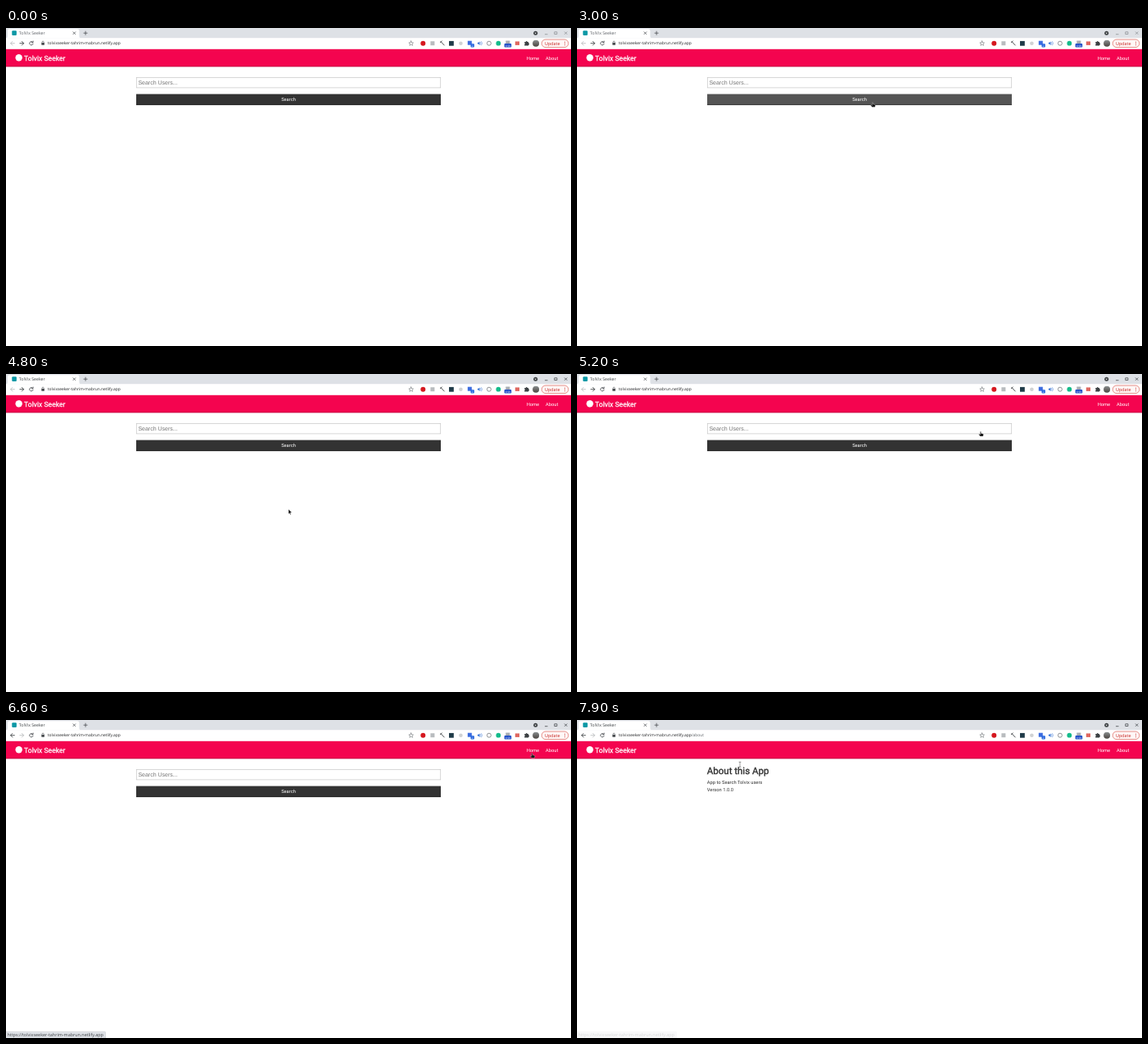
Animation of 690x388 px, one loop 8000 ms. Source, as an HTML page:

```html
<!DOCTYPE html>
<html lang="en">
<head>
<meta charset="utf-8">
<title>User search</title>
<style>
  html, body { margin: 0; width: 100%; height: 100%; overflow: hidden; background: #fff; }
  svg { display: block; width: 100vw; height: 100vh; }
  text { font-family: "Open Sans", "Noto Sans", sans-serif; text-rendering: geometricPrecision; white-space: pre; }
  .page text { font-family: Roboto, Arial, sans-serif; font-size: 5.75px; fill: #333; }
  .page .field { font-family: "Liberation Sans", Arial, sans-serif; font-size: 7px; fill: #757575; }
  .page .light { fill: #fff; }
  .page .brand { font-size: 8.62px; fill: #fff; stroke: #fff; stroke-width: .28px; }
  .page .title { font-size: 11.5px; stroke: #333; stroke-width: .38px; }
  .url { font-size: 4.9px; fill: #202124; }
  .list text { font-size: 5.5px; font-weight: 600; fill: #222; }
  .line { fill: none; stroke-linecap: round; stroke-linejoin: round; }
</style>
</head>
<body>
<svg viewBox="0 0 690 388" preserveAspectRatio="none">
  <defs>
    <filter id="shade" x="-10%" y="-20%" width="120%" height="150%">
      <feDropShadow dx="0" dy=".7" stdDeviation=".9" flood-opacity=".4"/>
    </filter>
    <linearGradient id="face" x2="0" y2="1">
      <stop stop-color="#8b8f90"/><stop offset="1" stop-color="#4b4541"/>
    </linearGradient>
  </defs>
  <rect width="690" height="388" fill="#fff"/>

  <!-- tab strip -->
  <rect width="690" height="12.2" fill="#dee1e6"/>
  <path d="M0 12.2q2 0 2-2V3.6q0-2.4 2.4-2.4H87q2.4 0 2.4 2.4v6.6q0 2 2 2z" fill="#fff"/>
  <rect x="7.3" y="3.3" width="5.6" height="5.6" rx="1" fill="#0b98a5"/>
  <text id="tab" x="15.8" y="8" font-size="5.2">TolVix Seeker</text>
  <g class="line" stroke="#45494d" stroke-width=".75">
    <path d="M82 4.8l2.8 2.8m0-2.8L82 7.6M95 6.2h4.2M97.1 4.1v4.2"/>
  </g>
  <circle cx="646.7" cy="6.2" r="2.5" fill="#3c4043"/>
  <path d="M645.5 5.7h2.4l-1.2 1.5z" fill="#fff"/>
  <g id="controls" class="line" stroke-width=".7">
    <path d="M658.4 7.7h2.7M670.2 4.8h2.7v2.7h-2.7zM682.3 4.8l2.7 2.7m0-2.7l-2.7 2.7"/>
  </g>

  <!-- toolbar -->
  <g class="line" stroke-width=".85">
    <path id="back" d="M10.4 18.7H5.7M7.9 16.4l-2.3 2.3 2.3 2.3"/>
    <path id="forward" d="M16.9 18.7h4.7M19.4 16.4l2.3 2.3-2.3 2.3"/>
    <path d="M32.7 17.3a2.2 2.2 0 1 0 .4 2M33.1 16v1.7h-1.8" stroke="#45494d"/>
    <path d="M44 18v-.8a1.1 1.1 0 0 1 2.2 0v.8" stroke="#45494d" stroke-width=".6"/>
    <path d="M494.7 15.9l.8 1.9 2 .2-1.5 1.3.5 2-1.8-1.1-1.8 1.1.5-2-1.5-1.3 2-.2z" stroke="#5f6368" stroke-width=".55"/>
  </g>
  <rect x="43.3" y="17.9" width="3.6" height="2.8" rx=".4" fill="#45494d"/>
  <text class="url" x="50.8" y="20.4"><tspan class="host"></tspan><tspan id="path" fill="#5f6368">/about</tspan></text>

  <!-- extensions -->
  <circle cx="509.3" cy="18.7" r="3" fill="#d5181f"/>
  <rect x="518.4" y="16.2" width="5" height="5" fill="#b9bcbf"/>
  <path class="line" d="M531 16.5l4.2 4.5M530.5 17.7l1.8-1.8" stroke="#4c4f52"/>
  <rect x="541" y="15.9" width="5.8" height="5.8" fill="#203b49"/>
  <circle cx="555.4" cy="18.7" r="2.3" fill="#d0d2d4"/>
  <rect x="563.8" y="15.7" width="5" height="5" fill="#3b6ce0"/>
  <rect x="567.5" y="19.2" width="4.3" height="4.2" rx=".7" fill="#1e5fdc"/>
  <text x="568.6" y="22.7" font-size="3.6" fill="#fff">2</text>
  <path d="M575.8 17.8h1.2l1.5-1.4v4.6L577 19.6h-1.2z" fill="#3974d5"/>
  <path class="line" d="M579.5 17.3q1.2 1.4 0 2.8M580.7 16.5q1.8 2.2 0 4.4" stroke="#3974d5" stroke-width=".5"/>
  <circle cx="589.9" cy="18.7" r="2.5" fill="none" stroke="#73777b" stroke-width=".8"/>
  <circle cx="601.3" cy="18.7" r="2.9" fill="#14bc8b"/>
  <rect x="610.3" y="15.5" width="5" height="4" fill="#a9adb2"/>
  <rect x="608.6" y="19" width="8.6" height="4.6" rx=".8" fill="#214fc8"/>
  <text x="609.8" y="22.6" font-size="3.1" fill="#fff">9.99</text>
  <rect x="621.8" y="16.4" width="5.2" height="4.5" fill="#df6760"/>
  <path d="M633.2 17.1h1.5a1 1 0 1 1 2 0h1.4v1.5a1 1 0 1 1 0 2v.9h-4.9V20a1 1 0 0 0 0-1.8z" fill="#3c4043"/>
  <circle cx="647.1" cy="18.7" r="4" fill="url(#face)"/>
  <rect x="654.2" y="14" width="32.6" height="9.6" rx="4.8" fill="#fff7f6" stroke="#d8554c" stroke-width=".65"/>
  <text x="658.1" y="20.6" font-size="5.4" fill="#c5221f">Update</text>
  <g fill="#c5221f"><circle cx="682.4" cy="16.9" r=".5"/><circle cx="682.4" cy="18.8" r=".5"/><circle cx="682.4" cy="20.7" r=".5"/></g>

  <!-- page -->
  <g class="page">
    <rect y="25.8" width="690" height="21.3" fill="#f4044f"/>
    <rect y="46.5" width="690" height=".8" fill="#b90a40"/>
    <circle cx="15.7" cy="36.3" r="4.2" fill="#fff"/>
    <text class="brand" x="22.1" y="39.5">Tolvix Seeker</text>
    <text class="light" x="635.7" y="38.7">Home</text>
    <text class="light" x="659.1" y="38.7">About</text>

    <g id="home">
      <rect x="159.3" y="60.6" width="371.4" height="12.3" fill="#fff" stroke="#c6c6c6" stroke-width=".7"/>
      <rect id="ring" x="159.2" y="60.7" width="371.6" height="12.2" rx=".8" fill="none" stroke="#111" stroke-width="1.2"/>
      <text class="field" x="161.4" y="69.2">Search Users...</text>
      <path id="caret" d="M161.6 63.4v6.8" stroke="#222" stroke-width=".4"/>
      <rect id="button" x="159" y="80.6" width="372" height="13.4"/>
      <path d="M159 93.7h372" stroke="#151515" stroke-width=".6"/>
      <text class="light" x="345" y="89.1" text-anchor="middle">Search</text>
    </g>
    <g id="about">
      <text class="title" x="158.8" y="66.1">About this App</text>
      <text x="158.8" y="78">App to Search Tolvix users</text>
      <text x="158.8" y="86.9">Verson 1.0.0</text>
    </g>
  </g>

  <g id="list" class="list">
    <rect x="158.8" y="76.5" width="69.1" height="29" rx="1" fill="#fff" filter="url(#shade)"/>
    <text x="163.2" y="85.4">tahrim mabrun</text>
    <text x="163.2" y="98.4">evan</text>
  </g>

  <g id="status">
    <path id="bubble" stroke="#c3c6ca" stroke-width=".5" fill="#dee1e6"/>
    <text x="1.4" y="385.8" font-size="5.45" fill="#3f4347">https://<tspan class="host"></tspan><tspan id="target">/about</tspan></text>
  </g>

  <g id="cursor">
    <path id="arrow" d="M0 0v5.8l1.3-1.1.9 2 .9-.4-.9-2 1.8-.2z" fill="#111" stroke="#fff" stroke-width=".35"/>
    <path id="hand" d="M-.6.4q.6-.7 1.1 0v2l2.2.5q.8.2.7 1l-.4 2.1h-3.7L-2.4 3.8q.1-.8.9-.5l.9.7z" fill="#111" stroke="#fff" stroke-width=".3"/>
    <path id="beam" class="line" d="M-1-3h2M0-3v6M-1 3h2" stroke="#555" stroke-width=".55"/>
  </g>
</svg>
<script>
const LOOP = 8000, STEP = 100;
const $ = id => document.getElementById(id);
const show = (id, on) => $(id).setAttribute('display', on ? 'inline' : 'none');
const within = (t, a, b) => t >= a && t < b;

document.querySelectorAll('.host').forEach(el => {
  el.textContent = 'tolvixseeker-tahrim-mabrun.netlify.app';
});

// Pointer path: time, x, y, shape
const path = [
  [2000, 535, 178, 'arrow'], [2300, 350, 140, 'arrow'], [2450, 278, 133, 'arrow'],
  [2600, 305, 147, 'arrow'], [2800, 355, 72, 'beam'], [2900, 361, 86, 'hand'],
  [3000, 361, 90.5, 'hand'], [3300, 200, 88, 'hand'], [3400, 137, 83, 'arrow'],
  [3600, 180, 68.5, 'beam'], [3700, 195.7, 67.3, 'beam'], [4200, 195.7, 67.3, 'beam'],
  [4300, 240, 100, 'arrow'], [4500, 330, 165, 'arrow'], [4800, 345, 165, 'arrow'],
  [5000, 450, 128, 'arrow'], [5100, 485, 90, 'hand'], [5200, 493, 70, 'hand'],
  [5300, 530, 58, 'arrow'], [5600, 625, 45, 'arrow'], [5700, 641, 38, 'hand'],
  [5800, 667, 34, 'hand'], [5900, 660, 22, 'arrow'], [6000, 645, 36, 'hand'],
  [6100, 642.5, 40.3, 'hand'], [6600, 642.5, 40.3, 'hand'], [6800, 667, 37, 'hand'],
  [7100, 667, 37, 'hand'], [7300, 644, 38, 'hand'], [7400, 580, 43, 'arrow'],
  [7700, 260, 52, 'arrow'], [7900, 199, 54.3, 'beam']
];

function pointer(t) {
  const i = path.findLastIndex(p => p[0] <= t);
  if (i < 0) return null;
  const a = path[i], b = path[i + 1] || a;
  const k = b === a ? 0 : (t - a[0]) / (b[0] - a[0]);
  return { x: a[1] + (b[1] - a[1]) * k, y: a[2] + (b[2] - a[2]) * k, shape: a[3] };
}

function draw(time) {
  const t = Math.floor(time % LOOP / STEP) * STEP;
  const p = pointer(t);

  show('cursor', p);
  if (p) {
    $('cursor').setAttribute('transform', `translate(${p.x} ${p.y})`);
    ['arrow', 'hand', 'beam'].forEach(s => show(s, s === p.shape));
  }
  const hover = p && p.shape === 'hand' && p.x > 159 && p.x < 531 && p.y > 80.6 && p.y < 94;
  $('button').setAttribute('fill', hover ? '#555' : '#333');

  // Clicking the field also activates the window
  const active = t >= 3900, focused = within(t, 3900, 4500);
  $('tab').setAttribute('fill', active ? '#3c4043' : '#5b5f64');
  $('controls').setAttribute('stroke', active ? '#33373a' : '#84888d');
  ['ring', 'list'].forEach(id => show(id, focused));
  show('caret', focused);

  const pushed = t >= 6300, about = t >= 6900;
  $('back').setAttribute('stroke', pushed ? '#3c4043' : '#babcbe');
  $('forward').setAttribute('stroke', pushed ? '#babcbe' : '#3c4043');
  show('home', !about);
  show('about', about);
  show('path', about);

  const toAbout = within(t, 5800, 5900) || within(t, 6700, 7200);
  const edge = toAbout ? 139 : 121.5;
  show('status', t >= 5700);
  show('target', toAbout);
  $('bubble').setAttribute('d', `M-1 380.2H${edge - 1}q1 0 1 1V389H-1z`);
  $('status').setAttribute('opacity', t < 7700 ? 1 : Math.max(.2, 1 - (t - 7600) / 375));
}

function tick(now) {
  draw(now);
  requestAnimationFrame(tick);
}
draw(0);
requestAnimationFrame(tick);
</script>
</body>
</html>
```
